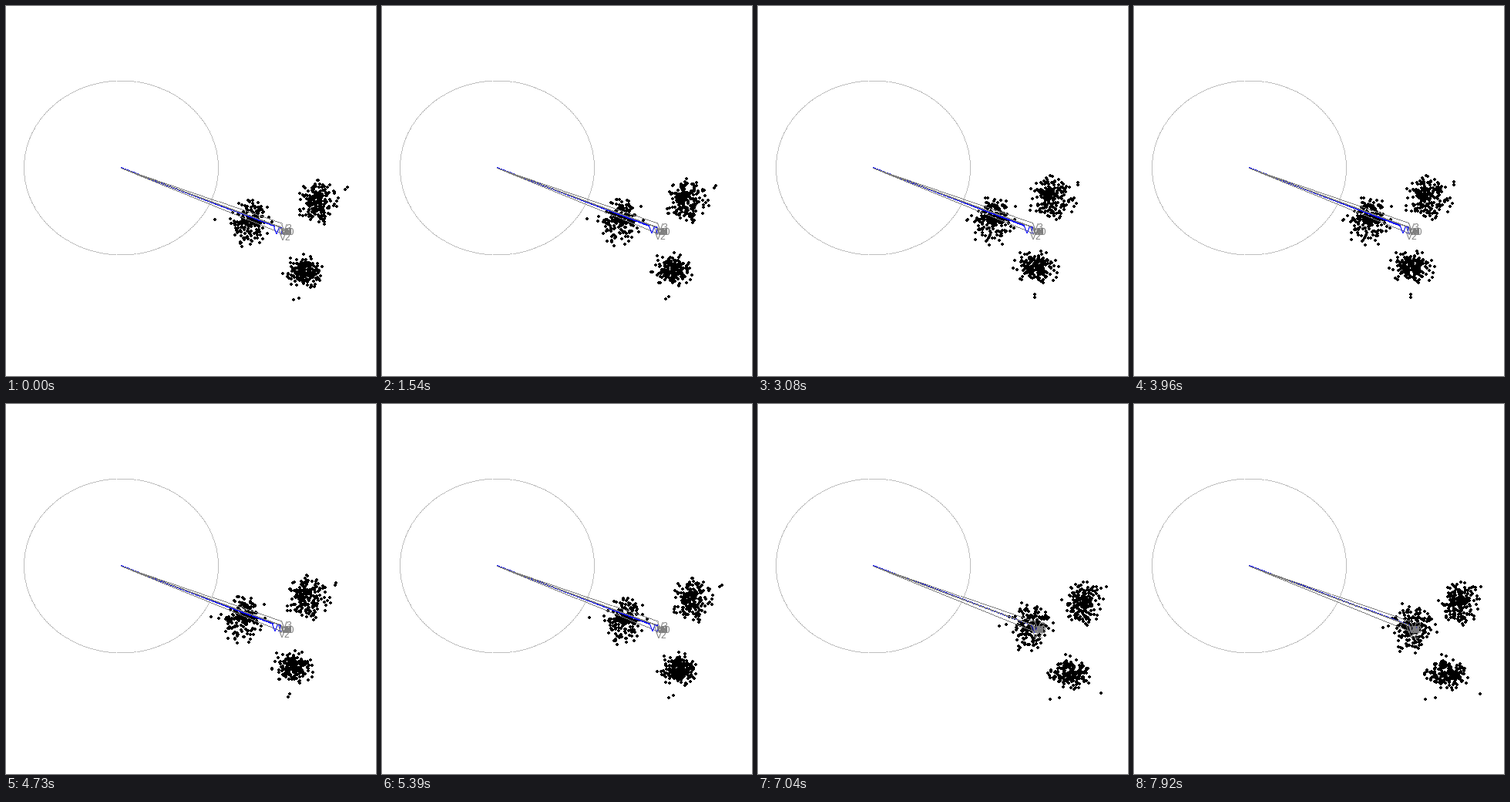
These frames come from a looping animation (480 px wide and 480 px high, 8 s). A matplotlib script:

```python
import math

import matplotlib.pyplot as plt
import numpy as np
from matplotlib.animation import FuncAnimation

SIZE, DPI = 480, 80
LOOP, TICK = 8000, 20            # ms
STEP = 0.05                      # tour angle per step
START, END = 0.655, math.pi / 2

ORIGIN = (371, 292)              # projected zero of the data
SLOPE = 0.24                     # screen direction of the motion
HUB = (149, 210)
GRAY, BLUE = "#7f7f7f", "#0000ff"


def cloud(rng, mean, spread, corr, n=200):
    """Points as (across, start, end); corr ties start to end."""
    z = rng.standard_normal((3 * n, 3))
    z = z[np.linalg.norm(z, axis=1) < 2.9][:n]
    z[:, 2] = corr * z[:, 1] + math.sqrt(1 - corr**2) * z[:, 2]
    return np.array(mean) + z * spread


rng = np.random.default_rng(7)
FAR = [(-70, 24, 60), (-67, 25, 54), (84, 7, 27), (80, 5, 39),
       (62, -18, 95), (9, -96, -36)]
DATA = np.vstack([
    cloud(rng, (3, -65, -2), (13.5, 12.5, 12.5), 0),
    cloud(rng, (-45, -3, 41), (12, 12, 11), -0.1),
    cloud(rng, (47, -2, 46), (8, 11, 12), -0.3),
    FAR,
])

# round dot: a 4 x 4 block without its corners
DOT = np.mgrid[-2:2, -2:2].reshape(2, -1)
DOT = DOT[:, np.abs(DOT + 0.5).sum(axis=0) < 3]


def angle(t):
    """Tour angle at t ms: down to 0, up to a right angle, then back."""
    if t < 660:
        return START
    if t < 3740:
        return max(START - STEP * (1 + (t - 660) // 220), 0)
    if t < 4400:
        return STEP * ((t - 3740) // 220)
    if t < 7700:
        return min(STEP * (3 + (t - 4400) // 110), END)
    return END - STEP * ((t - 7700) // 110)


def dot_pixels(phi):
    across, start, end = DATA.T
    along = start * math.cos(phi) + end * math.sin(phi)
    x = np.rint(ORIGIN[0] - SLOPE * across + along)
    y = np.rint(ORIGIN[1] + across + SLOPE * along)
    return np.add.outer(x, DOT[0]).ravel(), np.add.outer(y, DOT[1]).ravel()


def line_pixels(p, q, width=1):
    n = int(max(abs(q[0] - p[0]), abs(q[1] - p[1]))) + 1
    x = np.rint(np.linspace(p[0], q[0], n))
    y = np.rint(np.linspace(p[1], q[1], n))
    return np.tile(x, width), np.concatenate([y - k for k in range(width)])


def tip(k, phi):
    c, s = math.cos(phi), math.sin(phi)
    if k == 0:
        return 358 - 13 * c, 287.5 - 2.5 * c
    if k == 1:
        return 353 + 3.5 * s, 293 + s
    if k == 2:
        return 356 + 3 * s, 281 + s
    return 357 + 0.4 * math.sin(k), 287 + 0.4 * math.cos(k)


fig = plt.figure(figsize=(SIZE / DPI, SIZE / DPI), dpi=DPI, facecolor="white")
ax = fig.add_axes([0, 0, 1, 1])
ax.set_xlim(0, SIZE)
ax.set_ylim(SIZE - 1, -1)        # puts pixel markers on whole rows
ax.axis("off")


def pixels(color, x=(), y=()):
    return ax.plot(x, y, ",", color=color)[0]


turn = np.linspace(0, 2 * math.pi, 760)
pixels("#bebebe", np.rint(149 + 126 * np.cos(turn)),
       np.rint(209.5 + 113 * np.sin(turn)))
dots = pixels("black")

colors = [BLUE] + [GRAY] * 9
spokes = [pixels(color) for color in colors]
labels = [ax.text(0, 0, f"V{k + 1}", color=color, fontsize=12 * 72 / DPI,
                  family="Liberation Sans", ha="center", va="center")
          for k, color in enumerate(colors)]


def draw(i):
    phi = angle(i * TICK + TICK // 2)
    dots.set_data(*dot_pixels(phi))
    for k, (spoke, label) in enumerate(zip(spokes, labels)):
        x, y = tip(k, phi)
        spoke.set_data(*line_pixels(HUB, (x, y), 2 if k == 0 else 1))
        label.set_position((x + 7, y + 6))
    return [dots, *spokes, *labels]


anim = FuncAnimation(fig, draw, frames=LOOP // TICK, interval=TICK,
                     repeat=True, repeat_delay=0, blit=False)
plt.show()
```
